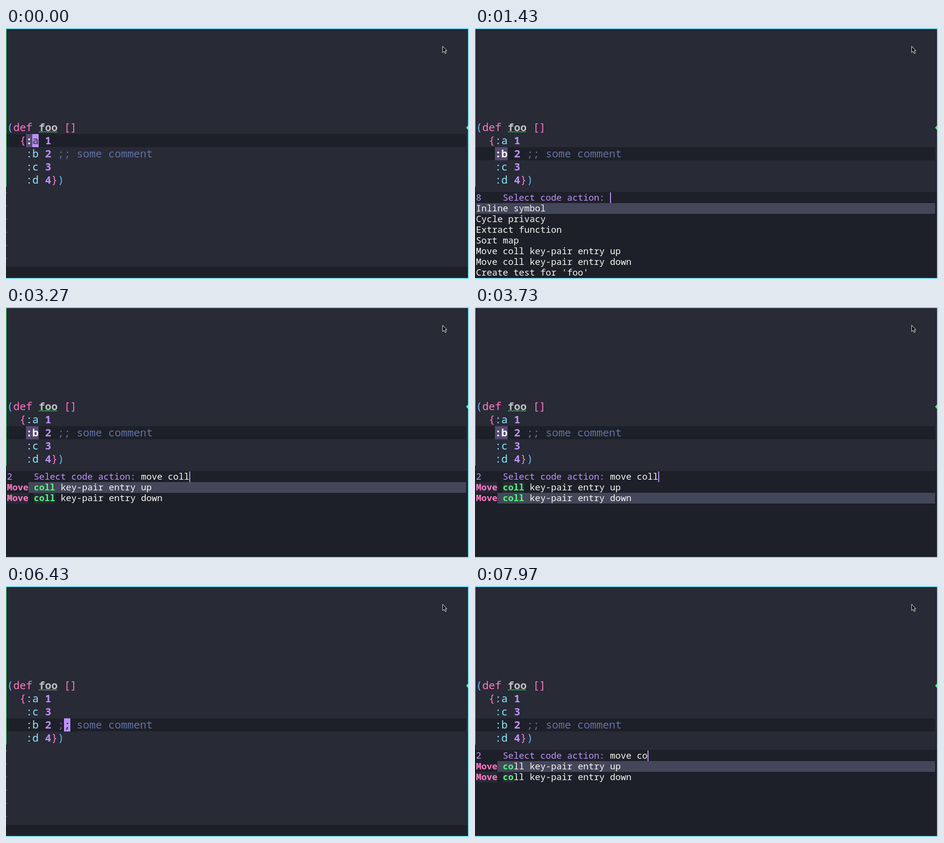
These frames come from a looping animation (950x516 px, 8 s). An HTML page:

```html
<!DOCTYPE html>
<html lang="en">
<head>
<meta charset="utf-8">
<title>Moving a map entry in an editor</title>
<style>
  html, body { margin: 0; width: 100%; height: 100%; overflow: hidden; background: #282a36; }
  svg { display: block; width: 950px; height: 516px; }
  text { font-family: "Noto Sans Mono", "DejaVu Sans Mono", monospace; white-space: pre; }
  .code { font-size: 21.667px; }
  .mini { font-size: 18.333px; }
</style>
</head>
<body>
<svg id="stage" viewBox="0 0 950 516">
  <rect width="950" height="516" fill="#282a36"/>
  <g id="scene"></g>
  <rect y="2" width="1" height="324" fill="#50fa7b"/>
  <path d="M948 200.5L944 205L948 209.500Z" fill="#50fa7b"/>
  <path d="M0 1H949V515H0" fill="none" stroke="#8be9fd" stroke-width="2"/>
  <path d="M896 37.500V50.500L899 47.800L901.200 52.500L903.300 51.500L901.200 46.800H904.500Z" fill="#000" stroke="#fff"/>
</svg>
<script>
const C = {
  bg: '#282a36', dark: '#1e2029', select: '#44475a', mark: '#554a71', white: '#f8f8f2',
  pink: '#ff79c6', purple: '#bd93f9', cyan: '#8be9fd', green: '#50fa7b',
  blue: '#61bfff', comment: '#6272a4', name: '#bfbfbf'
};
const LOOP = 8000, LEFT = 2;
const CODE = { cls: 'code', top: 191, cell: 13, line: 27, ascent: 21 };
const MINI = { cls: 'mini', top: 338, cell: 11, line: 22, ascent: 17 };
const PROMPT = 'Select code action: ';
const ACTIONS = ['Inline symbol', 'Cycle privacy', 'Extract function', 'Sort map',
  'Move coll key-pair entry up', 'Move coll key-pair entry down',
  "Create test for 'foo'", 'Change coll'];
const VISIBLE = 7;

// Each step changes part of the editor state and holds until the next one.
const steps = [
  [0, { order: 'abcd', row: 1, col: 4, mark: true, plain: false, cursor: true, input: null, pick: 0, echo: '' }],
  [430, { row: 2, mark: false }],
  [730, { mark: true }],
  [1230, { echo: 'SPC c-' }],
  [1330, { echo: 'SPC c a' }],
  [1430, { echo: '', cursor: false, input: '' }],
  ...typing([[2000, 2], [2170, 3], [2330, 4], [2530, 5], [2930, 7], [3130, 8], [3270, 9]]),
  [3730, { pick: 1 }],
  [4730, { input: null, pick: 0, cursor: true }],
  [4830, { order: 'acbd', row: 3, col: 22, mark: false, plain: true,
           echo: "Applying 1 edits to `move_coll_entry.clj' ...done" }],
  [5270, { plain: false }],
  [6030, { col: 21, echo: '' }],
  [6200, { col: 19 }],
  [6370, { col: 14 }],
  [6430, { col: 9 }],
  [6500, { col: 4 }],
  [6770, { echo: 'SPC-' }],
  [6830, { echo: 'SPC c-' }],
  [7030, { echo: 'SPC c a' }],
  [7170, { echo: '', cursor: false, input: '' }],
  ...typing([[7330, 1], [7430, 2], [7530, 3], [7630, 4], [7770, 5], [7870, 6], [7970, 7]])
];

function typing(keys) {
  return keys.map(([time, count]) => [time, { input: 'move coll'.slice(0, count) }]);
}

const escape = s => s.replace(/&/g, '&amp;').replace(/</g, '&lt;');
const rect = (x, y, w, h, fill) => `<rect x="${x}" y="${y}" width="${w}" height="${h}" fill="${fill}"/>`;
const cells = (g, row, col, count, fill) =>
  rect(LEFT + col * g.cell, g.top + row * g.line, count * g.cell, g.line, fill);
const text = (g, row, col, str, fill, bold) =>
  `<text class="${g.cls}" x="${LEFT + col * g.cell}" y="${g.top + row * g.line + g.ascent}" ` +
  `fill="${fill}"${bold ? ' font-weight="700"' : ''}>${escape(str)}</text>`;

function wave(x0, x1, y) {
  let d = `M${x0} ${y}`;
  for (let x = x0 + 2, i = 1; x <= x1; x += 2, i++) d += `L${x} ${y + (i % 2) * 2}`;
  return `<path d="${d}" fill="none" stroke="${C.green}"/>`;
}

function entry(s, key, row) {
  const number = 'abcd'.indexOf(key) + 1;
  const marked = s.mark && s.row === row;
  const plain = s.plain && (row === 2 || row === 3);
  let out = marked ? cells(CODE, row, 3, 2, C.mark) : '';
  out += text(CODE, row, 3, ':' + key, marked || plain ? C.white : C.cyan, marked);
  out += text(CODE, row, 6, String(number), plain ? C.white : C.purple, !plain);
  if (key === 'b') out += text(CODE, row, 8, ';; some comment', C.comment);
  return out;
}

function caret(s) {
  const key = s.order[s.row - 1];
  const line = `   :${key} ${'abcd'.indexOf(key) + 1}` + (key === 'b' ? ' ;; some comment' : '');
  return cells(CODE, s.row, s.col, 1, C.purple) +
    text(CODE, s.row, s.col, line[s.col], s.mark ? C.mark : C.dark, s.mark);
}

function buffer(s) {
  let out = rect(0, CODE.top + s.row * CODE.line, 944, CODE.line, C.dark);
  out += text(CODE, 0, 0, '(', C.blue) + text(CODE, 0, 1, 'def', C.pink) +
    text(CODE, 0, 5, 'foo', C.name, true) + text(CODE, 0, 9, '[]', C.pink) +
    wave(67, 106, 212.5) + text(CODE, 1, 2, '{', C.pink);
  [...s.order].forEach((key, i) => { out += entry(s, key, i + 1); });
  out += text(CODE, 4, 7, '}', C.pink) + text(CODE, 4, 8, ')', C.blue);
  for (let i = 0; i < 6; i++) out += rect(0, 338 + i * 27, 2, 1.5, C.comment);
  return s.cursor ? out + caret(s) : out;
}

function candidate(label, row, words, current) {
  let out = current ? rect(LEFT, MINI.top + row * MINI.line, 942, MINI.line, C.select) : '';
  const style = Array(label.length).fill(-1);
  words.forEach((word, i) => {
    const at = label.toLowerCase().indexOf(word);
    style.fill(i, at, at + word.length);
  });
  for (let a = 0, b; a < label.length; a = b) {
    for (b = a + 1; b < label.length && style[b] === style[a];) b++;
    const hit = style[a];
    if (hit >= 0 && !(current && hit)) out += cells(MINI, row, a, b - a, current ? C.dark : C.bg);
    out += text(MINI, row, a, label.slice(a, b), [C.white, C.pink, C.green][hit + 1], hit >= 0);
  }
  return out;
}

function picker(s) {
  const words = s.input.split(' ').filter(Boolean);
  const found = ACTIONS.filter(a => words.every(w => a.toLowerCase().includes(w)));
  const start = 5 + PROMPT.length;
  let out = rect(0, 337, 948, 177, C.dark) +
    text(MINI, 0, 0, String(found.length), C.purple) +
    text(MINI, 0, 5, PROMPT, C.purple) + text(MINI, 0, start, s.input, C.white) +
    rect(LEFT + (start + s.input.length) * MINI.cell, MINI.top, 2, MINI.line, C.purple);
  found.slice(0, VISIBLE).forEach((label, i) => {
    out += candidate(label, i + 1, words, i === s.pick);
  });
  return out;
}

const echoArea = s => rect(0, 491, 948, 23, C.dark) + text(MINI, 7, 0, s.echo, C.white);

const scene = document.getElementById('scene');
let shown = -1;

function render(time) {
  const count = steps.filter(([at]) => at <= time).length;
  if (count === shown) return;
  shown = count;
  const state = Object.assign({}, ...steps.slice(0, count).map(([, change]) => change));
  scene.innerHTML = buffer(state) + (state.input === null ? echoArea(state) : picker(state));
}

const begin = performance.now();
function frame() {
  render((performance.now() - begin) % LOOP);
  requestAnimationFrame(frame);
}
frame();
</script>
</body>
</html>
```
